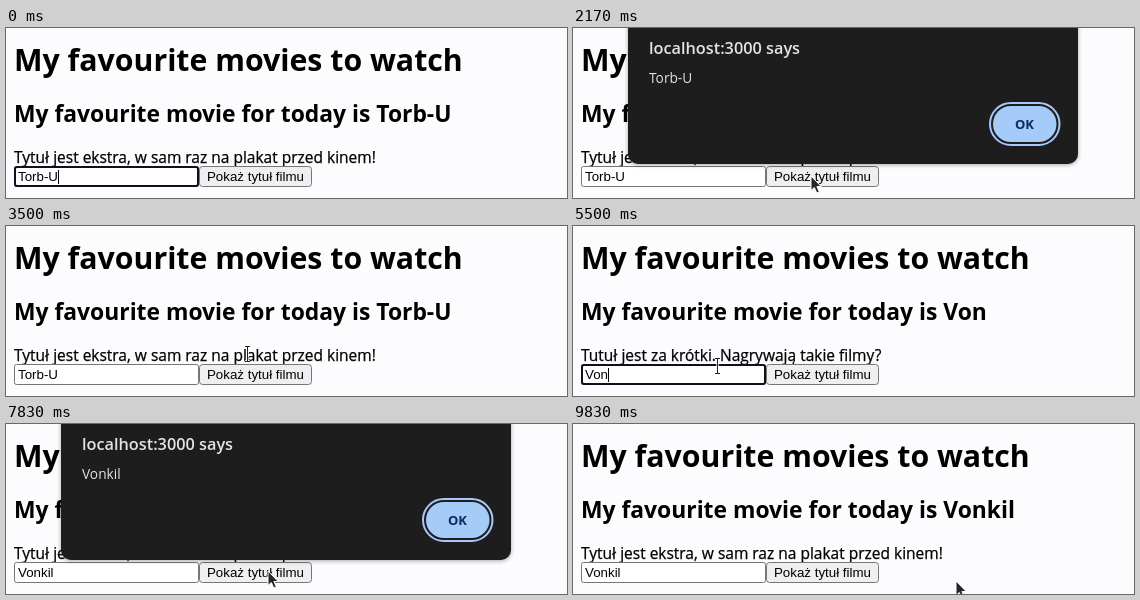
An HTML page that plays this animation: 561 px wide and 170 px high, repeating every 9.91 s.

```html
<!DOCTYPE html>
<html lang="pl">
<head>
<meta charset="utf-8">
<style>
  html, body { margin: 0; width: 100%; height: 100%; overflow: hidden; background: #fcfcfe; }
  svg { display: block; width: 561px; height: 170px; font-family: "Open Sans", "Noto Sans", sans-serif; }
  text { white-space: pre; }
  .h1 { font-size: 30.25px; font-weight: 700; }
  .h2 { font-size: 22.85px; font-weight: 700; }
  .p { font-size: 15.5px; stroke: #000; stroke-width: .25px; }
  .control { font: 13.333px "Liberation Sans", Arial, sans-serif; }
  .dialog { filter: drop-shadow(0 1px 2px #0005); }
</style>
</head>
<body>
<svg viewBox="0 0 561 170">
  <text class="h1" x="8" y="43">My favourite movies to watch</text>
  <text class="h2" x="8" y="94" id="heading"></text>
  <text class="p" x="8" y="135" id="verdict"></text>

  <rect x="8.5" y="138.5" width="184" height="20" rx="2" fill="#fff" stroke="#767676"/>
  <rect id="ring" x="9" y="139" width="183" height="19" rx="2" fill="none" stroke="#10101c" stroke-width="2"/>
  <text class="control" x="12" y="153" id="field"></text>
  <rect id="caret" y="142" width="1" height="14"/>

  <rect id="button" x="193.5" y="138.5" width="112" height="20" rx="3" stroke="#767676"/>
  <text class="control" x="249.5" y="153" text-anchor="middle">Pokaż tytuł filmu</text>

  <g id="dialog">
    <path class="dialog" d="M55 -5H505V126a10 10 0 0 1-10 10H65a10 10 0 0 1-10-10Z" fill="#1e1d1e"/>
    <text x="76" y="25.5" font-size="16.3" font-weight="600" fill="#e3e3e3">localhost:3000 says</text>
    <text x="76" y="55" font-size="13.7" fill="#e3e3e3" id="alert"></text>
    <rect x="417" y="75" width="69.5" height="42" rx="21" fill="none" stroke="#a8c7fa" stroke-width="2"/>
    <rect x="420" y="78" width="63.5" height="36" rx="18" fill="#a5cbf8"/>
    <text x="451.5" y="101" font-size="13" font-weight="700" fill="#0b2c5c" text-anchor="middle">OK</text>
  </g>

  <path id="arrow" d="M0 0V14.5L3.3 11.5 5.8 17 8.3 15.9 5.9 10.5H10.2Z" fill="#252528" stroke="#fff" stroke-width="1"/>
  <g id="beam" fill="none">
    <path d="M-2 -7.5H3M.5 -7.5V7.5M-2 7.5H3" stroke="#fff" stroke-width="2.4"/>
    <path d="M-2 -7.5H3M.5 -7.5V7.5M-2 7.5H3" stroke="#222"/>
  </g>
</svg>
<script>
const LOOP = 9910, FPS = 12;
const FIRST = "Torb-U", SECOND = "Vonkil";
const $ = id => document.getElementById(id);
const show = (id, on) => $(id).setAttribute("visibility", on ? "visible" : "hidden");
const within = (t, spans) => spans.some(([from, to]) => t >= from && t < to);

const focusSpans = [[0, 1830], [4080, 7080]];
const dialogSpans = [[1910, 2910], [7160, 9080]];

// Each edit is [time, field value]: erase the first title, then type the second.
const edits = [[0, FIRST]];
for (let i = 1; i <= 6; i++) edits.push([4240 + i * 83, FIRST.slice(0, -i)]);
[4990, 5160, 5410, 5910, 6080, 6330].forEach((t, i) => edits.push([t, SECOND.slice(0, i + 1)]));

// Pointer stops: [time, x, y]
const route = [
  [580, 290, 172], [1660, 238, 148], [2180, 238, 148], [2750, 438, 103], [2920, 438, 103],
  [3500, 241, 128], [4000, 144, 140], [6410, 144, 140], [7000, 262, 147], [7840, 262, 147],
  [8500, 438, 103], [9160, 438, 103], [9833, 383, 157], [LOOP, 378, 172]
];

function pointerAt(t) {
  const next = route.findIndex(stop => stop[0] > t);
  if (next < 1) return null;
  const [t0, x0, y0] = route[next - 1], [t1, x1, y1] = route[next];
  const u = (t - t0) / (t1 - t0), k = u * u * (3 - 2 * u);
  return [x0 + (x1 - x0) * k, y0 + (y1 - y0) * k];
}

const inBox = ([x, y], left, top, right, bottom) => x >= left && x < right && y >= top && y < bottom;

function drawPointer(pos, dialogOpen) {
  const overText = pos && !dialogOpen &&
    (inBox(pos, 8, 138, 193, 159) || inBox(pos, 8, 120, 370, 138) || inBox(pos, 8, 72, 446, 100));
  show("arrow", pos && !overText);
  show("beam", overText);
  if (pos) for (const id of ["arrow", "beam"])
    $(id).setAttribute("transform", `translate(${pos.map(Math.round)})`);
}

function draw(t) {
  const [editTime, value] = edits.filter(edit => edit[0] <= t).pop();
  const focused = within(t, focusSpans), dialogOpen = within(t, dialogSpans);
  const pos = pointerAt(t);

  $("heading").textContent = "My favourite movie for today is " + value;
  $("verdict").textContent = value.length < 5
    ? "Tutuł jest za krótki. Nagrywają takie filmy?"
    : "Tytuł jest ekstra, w sam raz na plakat przed kinem!";
  $("field").textContent = $("alert").textContent = value;

  const blinkStart = t < 4080 ? 0 : Math.max(4080, editTime);
  show("ring", focused);
  show("caret", focused && (t - blinkStart) % 1000 < 500);
  $("caret").setAttribute("x", Math.round(12 + (value && $("field").getComputedTextLength())));

  const hovered = pos && !dialogOpen && inBox(pos, 193, 138, 306, 159);
  $("button").setAttribute("fill", hovered ? "#e5e5e7" : "#efeff1");
  show("dialog", dialogOpen);
  drawPointer(pos, dialogOpen);
}

function tick() {
  const t = performance.now() % LOOP;
  draw(Math.floor((t + 7) * FPS / 1000) * 1000 / FPS);
  requestAnimationFrame(tick);
}
tick();
</script>
</body>
</html>
```
